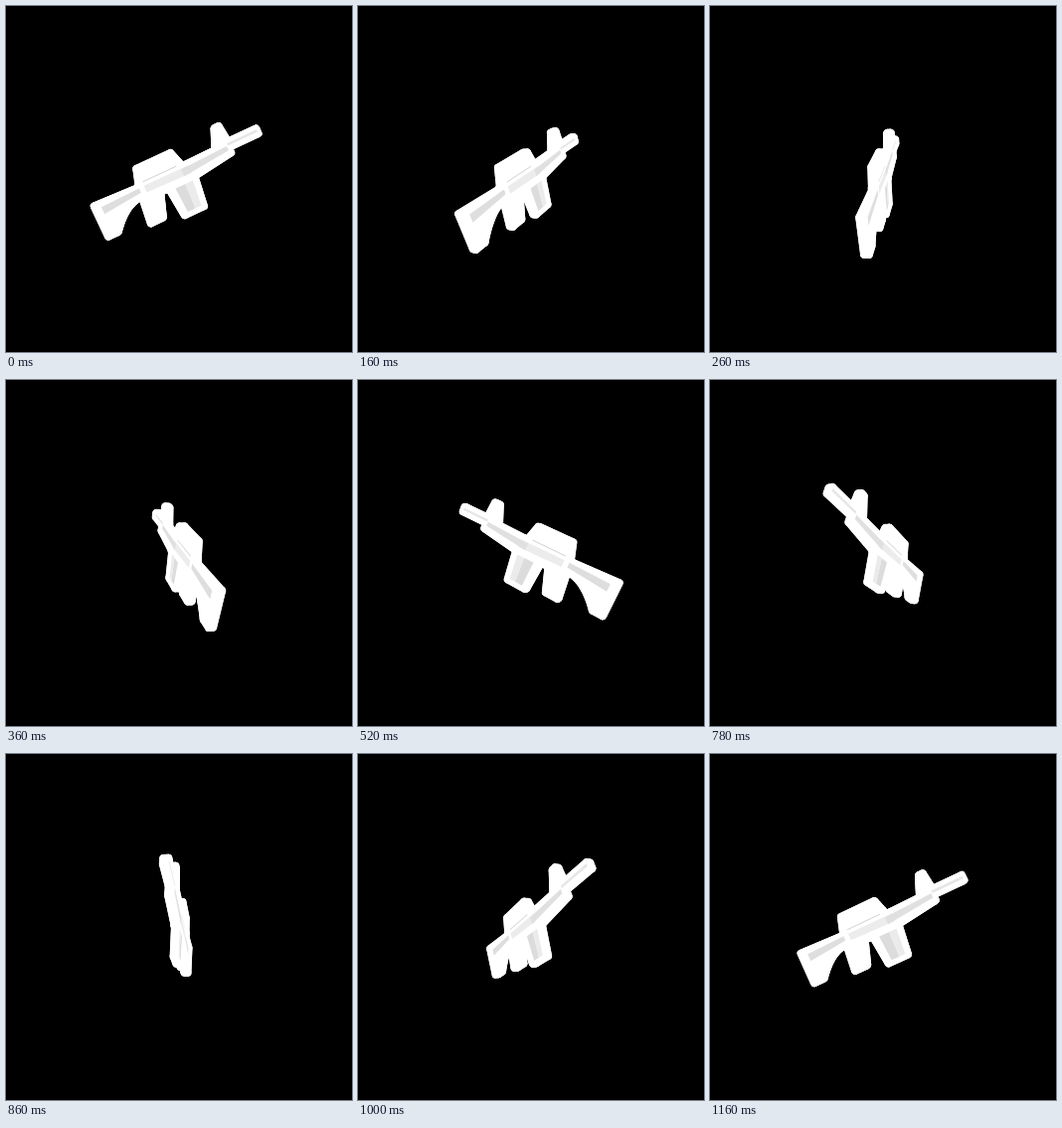
An HTML page with a canvas that plays this animation: 348x348 px, repeating every 1.18 s.

```html
<!DOCTYPE html>
<html>
<head>
<meta charset="utf-8">
<style>
html, body { margin: 0; width: 100%; height: 100%; overflow: hidden; background: #000; }
canvas { display: block; }
</style>
</head>
<body>
<canvas id="stage" width="348" height="348"></canvas>
<script>
const ctx = document.getElementById('stage').getContext('2d');
const CENTER = 174, CAMERA = 280, LOOP = 1180, STEP = 20, RIM = 8;
const START = 0.5 * Math.PI / 180, TILT = -25 * Math.PI / 180;
const mix = (a, b, k) => a + (b - a) * k;

// Profiles lie along the barrel axis: u runs to the muzzle, v runs down.
// A block has level top and bottom edges; a beam has upright ends.
const block = (vTop, l, r, vBottom, bl, br) =>
  [[l, vTop], [r, vTop], [br, vBottom], [bl, vBottom]];
const beam = (l, lTop, lBottom, r, rTop, rBottom) =>
  [[l, lTop], [r, rTop], [r, rBottom], [l, lBottom]];

function stockProfile() {
  const points = [[-38, -9], [-88, -11], [-88, 22]];
  for (let k = 1; k >= 0; k -= 0.125) points.push([-42 - 36 * k, 22 * k * k]);
  return points;
}

// Part of a four-sided profile, given as fractions of its width and height.
function inset(quad, x0, x1, y0, y1) {
  const at = (x, y) => [0, 1].map(i =>
    mix(mix(quad[0][i], quad[1][i], x), mix(quad[3][i], quad[2][i], x), y));
  return [at(x0, y0), at(x1, y0), at(x1, y1), at(x0, y1)];
}

const neck = beam(-84, -10, 3, -40, -10, -2);
const receiver = beam(-40, -10, 3, 14, -10, 5);
const grip = block(2, -41, -22, 28, -44, -31);
const magazine = block(4, -13, 15, 35, -10, 11);
const handguard = beam(6, -10, 5, 58, -11, -2);
const barrel = beam(50, -13, -8, 91, -13, -8);
const sight = block(-31, 54, 58, -14, 47, 60);
const handle = block(-27, -34, 3, -11, -39, 8);

const thick = [receiver, handguard, handle];
const thin = [stockProfile(), grip, magazine, barrel, sight];
const solids = [
  ...thick.map(profile => ({ profile, half: 2.5 })),
  ...thin.map(profile => ({ profile, half: 1.8 }))
];
const shades = [
  ['#dedede', inset(neck, 0.05, 1, 0.2, 0.8)],
  ['#ececec', inset(receiver, 0.1, 1, 0.1, 0.65)],
  ['#e0e0e0', inset(handguard, 0, 0.98, 0.15, 0.65)],
  ['#e6e6e6', inset(barrel, 0.2, 1, 0.2, 0.7)],
  ['#dcdcdc', inset(magazine, 0.2, 0.6, 0.1, 0.95)],
  ['#ebebeb', inset(magazine, 0.6, 0.9, 0.1, 0.95)],
  ['#d2d2d2', inset(handle, 0.1, 0.9, 0.86, 0.92)]
];

function project([u, v], z, angle) {
  const x = u * Math.cos(TILT) - v * Math.sin(TILT);
  const y = u * Math.sin(TILT) + v * Math.cos(TILT);
  const c = Math.cos(angle), s = Math.sin(angle);
  const scale = CAMERA / (CAMERA + x * s + z * c);
  return [CENTER + (x * c - z * s) * scale, CENTER + y * scale];
}

function trace(points) {
  ctx.beginPath();
  points.forEach(p => ctx.lineTo(p[0], p[1]));
  ctx.closePath();
}

function fillRimmed(points) {
  trace(points);
  ctx.fill();
  ctx.stroke();
}

function area(points) {
  return points.reduce((sum, p, i) => {
    const q = points[(i + 1) % points.length];
    return sum + p[0] * q[1] - q[0] * p[1];
  }, 0);
}

function drawSolid({ profile, half }, angle) {
  const [a, b] = [-half, half].map(z => profile.map(p => project(p, z, angle)));
  fillRimmed(a);
  fillRimmed(b);
  a.forEach((p, i) => {
    const j = (i + 1) % a.length;
    fillRimmed([p, a[j], b[j], b[i]]);
  });
}

// Shading shows only on the flank that faces the camera.
function drawShade([color, profile], angle) {
  for (const z of [-2.5, 2.5]) {
    const points = profile.map(p => project(p, z, angle));
    if (area(points) * z < 0) {
      trace(points);
      ctx.fillStyle = color;
      ctx.fill();
    }
  }
}

function draw(time) {
  const t = Math.floor(time % LOOP / STEP) * STEP;
  const angle = START + 2 * Math.PI * t / LOOP;
  ctx.fillStyle = '#000';
  ctx.fillRect(0, 0, 348, 348);
  ctx.fillStyle = ctx.strokeStyle = '#fff';
  ctx.lineWidth = RIM;
  ctx.lineJoin = 'round';
  solids.forEach(solid => drawSolid(solid, angle));
  shades.forEach(shade => drawShade(shade, angle));
}

const begin = performance.now();
function tick() {
  draw(performance.now() - begin);
  requestAnimationFrame(tick);
}
tick();
</script>
</body>
</html>
```
